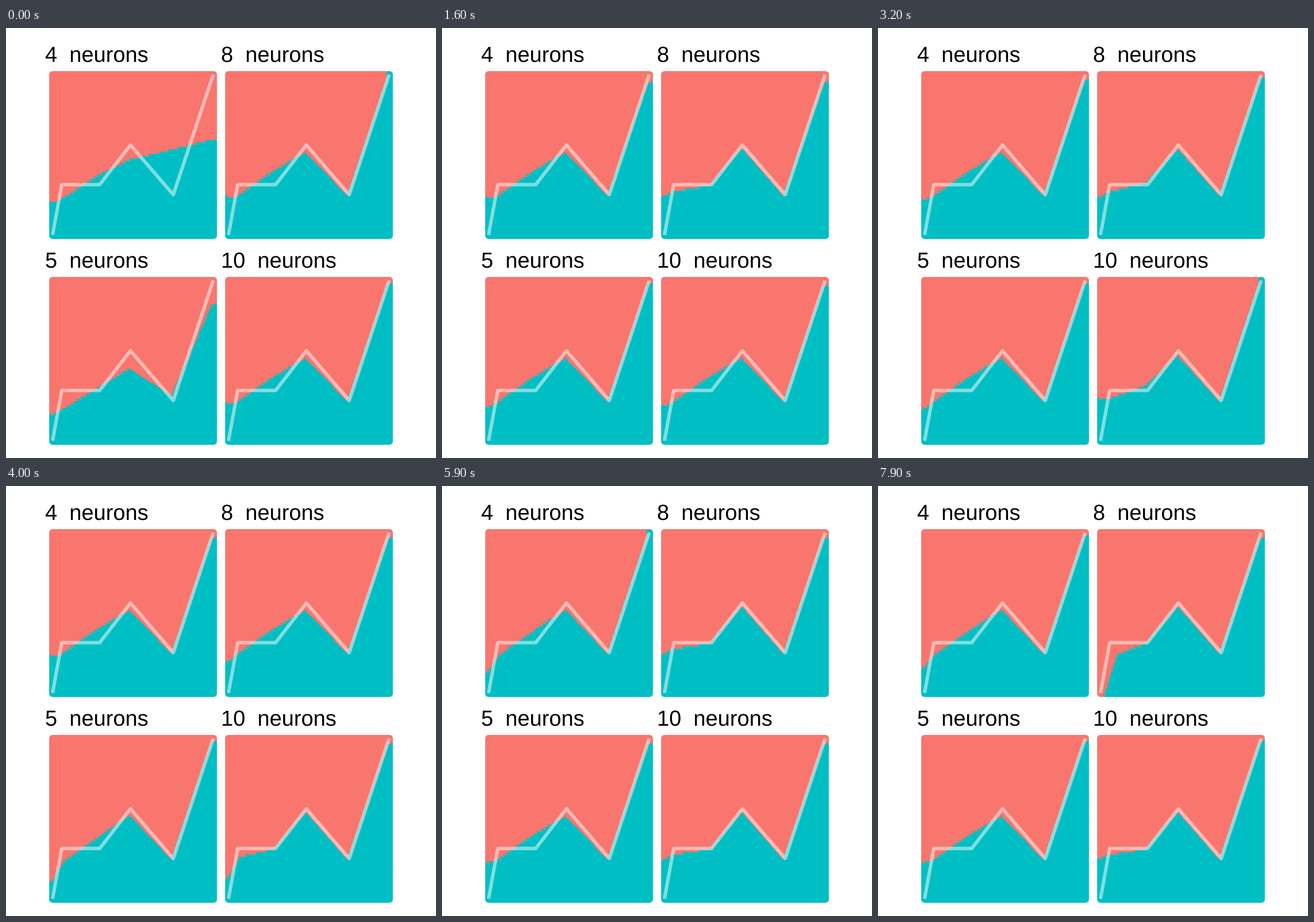
Recreate the animation shown at these times as a matplotlib script. Size 748 by 748 pixels, loop 8 s.

```python
import matplotlib.pyplot as plt
import numpy as np
from matplotlib.animation import FuncAnimation
from matplotlib.collections import LineCollection

SIZE, DPI = 748, 100
FRAMES, INTERVAL = 80, 100
PX = 72 / DPI
RED, BLUE = "#F8766D", "#00BFC4"

SIDE, DOT = 280, 12
COLS = np.linspace(0, SIDE, 141)
ROWS = np.linspace(SIDE, 0, 71)
TRUTH = np.array([(0, 279), (16, 191.5), (82, 191.5),
                  (135.5, 122.5), (210, 209), (279.5, 0)])

plt.rcParams["font.family"] = "Liberation Sans"
plt.rcParams["text.hinting"] = "none"


def bump(t, centre, width=4):
    return np.exp(-((t - centre) / width) ** 2)


class Panel:
    """Decision boundary of one net, a piecewise linear fit to TRUTH.

    lift(t): 0 follows the plateau, 1 cuts straight across it.
    dips: (step, depth) moments when the left end drops.
    start: extra plateau, peak, valley and right heights before training.
    """

    def __init__(self, neurons, x, y, lift, dips, start=(0, 0, 0, 0)):
        self.label = f"{neurons}  neurons"
        self.x, self.y = x, y
        self.lift, self.dips = lift, dips
        self.start = np.array(start)
        rng = np.random.default_rng(neurons)
        self.noise = rng.normal(0, 4, (FRAMES, 2))

    def fit(self, t):
        dip = sum(depth * bump(t, step) for step, depth in self.dips)
        lift = max(self.lift(t) - dip / 200, 0)
        flat, peak, valley, right = self.start * np.exp(-t / 2.5)
        jitter = self.noise[t]
        xs = [0, 16 + 0.15 * dip, 82, 137, 210, SIDE]
        ys = [202 + 12 * lift + dip + flat + jitter[0],
              199 + 10 * lift + 0.08 * dip + 0.7 * flat,
              189 - 26 * lift + flat,
              124 + 7 * lift + peak,
              207 + valley,
              5 + right + jitter[1]]
        return np.interp(COLS, xs, ys)

    def runs(self, t):
        """Rows of round dots, bottom to top, merged into runs of one colour."""
        fit = self.fit(t)
        for row in ROWS:
            below = row > fit
            cuts = np.flatnonzero(np.diff(below.astype(int))) + 1
            for a, b in zip([0, *cuts], [*cuts, len(COLS)]):
                y = self.y + row
                ends = [(self.x + COLS[a], y), (self.x + COLS[b - 1] + 0.05, y)]
                yield ends, BLUE if below[a] else RED


panels = [
    Panel(4, 81, 81, lambda t: 1, [(59, 28), (79, 20)], (8, 13, -80, 105)),
    Panel(8, 387, 81, lambda t: bump(t, 0) + bump(t, 40, 6),
          [(9, 150), (79, 110)]),
    Panel(5, 81, 439, lambda t: 1, [(23, 90), (40, 40), (70, 40)],
          (20, 18, -10, 38)),
    Panel(10, 387, 439, lambda t: 1 / (1 + np.exp((t - 31) / 2)),
          [(9, 25), (40, 42)]),
]

fig = plt.figure(figsize=(SIZE / DPI, SIZE / DPI), dpi=DPI, facecolor="white")
ax = fig.add_axes([0, 0, 1, 1])
ax.set(xlim=(0, SIZE), ylim=(SIZE, 0))
ax.axis("off")

dots = LineCollection([], linewidths=DOT * PX, capstyle="round", zorder=1)
dots.set_snap(False)
ax.add_collection(dots, autolim=False)

for p in panels:
    ax.plot(p.x + TRUTH[:, 0], p.y + TRUTH[:, 1], color="white", alpha=0.5,
            lw=6 * PX, solid_capstyle="butt", solid_joinstyle="round", zorder=2)
    ax.text(p.x - 13, p.y - 22, p.label, fontsize=38 * PX, color="black",
            ha="left", va="baseline")


def update(t):
    segs, colors = zip(*(run for p in panels for run in p.runs(t)))
    dots.set_segments(segs)
    dots.set_color(colors)
    return [dots]


anim = FuncAnimation(fig, update, frames=FRAMES, interval=INTERVAL,
                     repeat=True, repeat_delay=0, blit=False)
plt.show()
```
